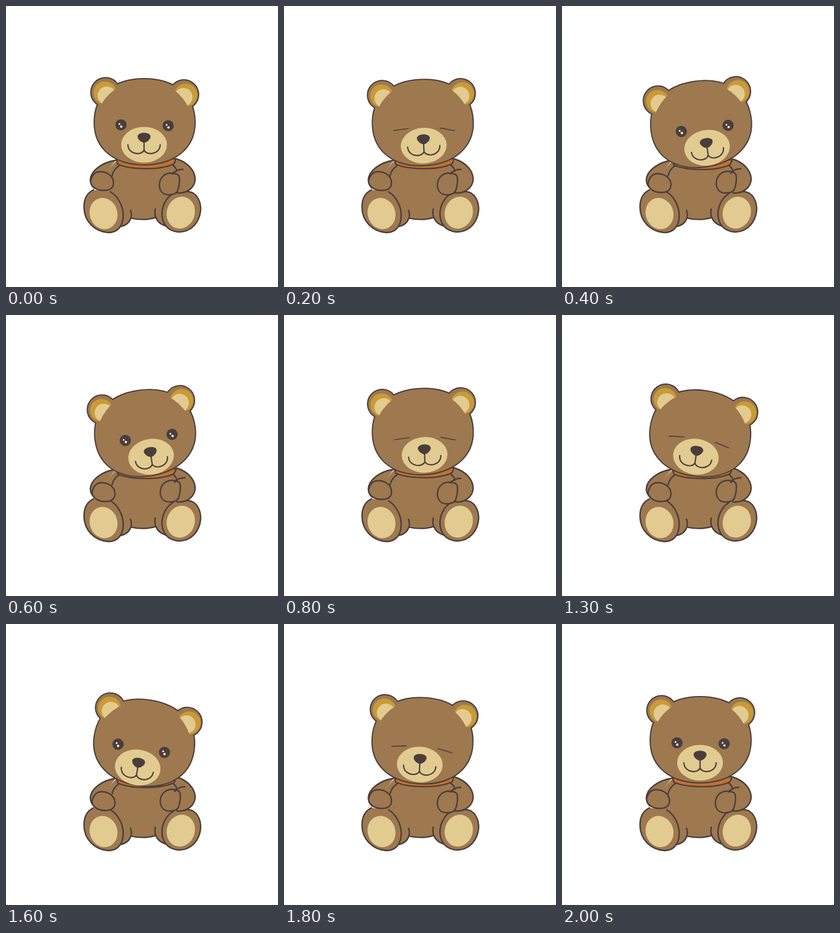
These frames come from a looping animation (463x480 px, 2100 ms). An HTML page with a canvas:

```html
<!DOCTYPE html>
<html lang="en">
<head>
<meta charset="utf-8">
<title>Teddy bear</title>
<style>
  html, body { margin: 0; width: 100%; height: 100%; overflow: hidden; background: #fff; }
  canvas { display: block; }
</style>
</head>
<body>
<canvas id="stage" width="463" height="480"></canvas>
<script>
const ctx = document.getElementById('stage').getContext('2d');
const FUR = '#9e784f', LINE = '#493e3b', CREAM = '#e2cb91', GOLD = '#c99b36', COLLAR = '#c4702f';
const STEP = 100, LOOP = 2100, RAD = Math.PI / 180;

// Full poses at either side: angle, head dx, dy, extra face dx, dy
const RIGHT = [-8.5, 1, 4, 5.5, 1.5];
const LEFT = [9, -1, 5, -4, 3.5];

// One nod, per step: head amount, face amount
const NOD = [[0, 0], [.05, 0], [.35, .1], [.9, .25], [1, 1], [1, 1], [1, 1], [.85, .9], [.33, .4], [.05, .05]];
const BLINK = [2, 3, 7, 8];

const body = new Path2D(`M190 262 L150 306 L180 330 L190 377 C203 376 212 369 213 362
  C226 365 242 365 255 361 C257 368 262 373 272 376 L300 322 L296 264 Z`);
const belly = new Path2D(`M212 349 C214 355 214 358 212.5 362.3 C226 365.3 242 365.3 255 361.3
  M254 347 C253 353 253 357 255 361.3 C258 369 263 373 271 375.5
  M212.5 362.3 C210 370 204 375.5 193 377`);
const leftFoot = new Path2D(`M178 317.5 C191 325 200 343 199.5 359 C199 377 189 387.5 174 387
  C150 385.5 133.3 367 132.8 345 C132.3 330 138.3 319 149 314`);
const rightFoot = new Path2D(`M284 320.5 C267 331 261 355 269 371 C277 386.5 297 389.2 310.5 382.3
  C326.3 374.5 334.3 354.5 330.3 337 C326.3 322 316 314 301 318`);
const leftArm = new Path2D(`M187 263.5 C164 267 143.5 281 143.5 298 C144 303 146 308 150 311`);
const rightArm = new Path2D(`M291 261.5 C308 267 322 280 322 296 C321.5 310 308 321 291 319.3`);
const armFolds = new Path2D(`M193 272.5 C186 277 182 283 180.5 290 M283 271 C287 274 290 278 291 282`);
const elbow = new Path2D(`M301 279 C294 279 287 282 283.5 287`);
const leftHand = new Path2D(`M144 299 C146 290 151 283 160 283 C173 283 183 291 183 302
  C183 312 175 315.5 165 315 C155 315 144 309 144 299 Z`);
const rightHand = new Path2D(`M295 293 C295 288 288 285 280 285.5 C268 286 261 295 261 307
  C262 318 269 323 279 322.5 C288 322 292 318 293 313 C295 306 296 300 295 293 Z`);
const collar = new Path2D(`M188 261 L190.5 270.5 C215 280.5 264 280.5 286 269.5 L290 261 Z`);
const head = new Path2D(`M235 125 C284.5 125 321 150.5 321 199 C321 245 283 270.5 235 270.5
  C187 270.5 151 245 151 199 C151 150.5 185.5 125 235 125 Z`);
const nose = new Path2D(`M235 216.5 C241 216.5 246 219 246 223 C246 228 239 233.5 235 233.5
  C231 233.5 224 228 224 223 C224 219 229 216.5 235 216.5 Z`);
const mouth = new Path2D(`M235 232 L235 246 M207.5 237 C208 254 231 256 235 246
  C239 256 262 254 262.5 237`);

function oval(x, y, rx, ry = rx, turn = 0) {
  const p = new Path2D();
  p.ellipse(x, y, rx, ry, turn * RAD, 0, Math.PI * 2);
  return p;
}

function fill(p, color) {
  ctx.fillStyle = color;
  ctx.fill(p);
}

function stroke(p, width = 2.4) {
  ctx.strokeStyle = LINE;
  ctx.lineWidth = width;
  ctx.stroke(p);
}

function shape(p) {
  fill(p, FUR);
  stroke(p);
}

function moved(dx, dy, draw) {
  ctx.save();
  ctx.translate(dx, dy);
  draw();
  ctx.restore();
}

function drawBody(tilt) {
  const k = tilt > .5 ? 1 : 0;
  fill(body, FUR);
  stroke(belly);
  for (const p of [leftFoot, rightFoot, leftArm, rightArm]) shape(p);
  stroke(armFolds);
  fill(oval(166, 354.5, 23.5, 27, -17), CREAM);
  fill(oval(297.5, 353, 23.8, 27.5, 17), CREAM);
  moved(2.5 * k, 3.5 * k, () => shape(leftHand));
  moved(1.5 * k, -3 * k, () => shape(rightHand));
  moved(3.5 * k, -k, () => stroke(elbow));
  moved(0, 1.5 * k, () => {
    fill(collar, COLLAR);
    stroke(collar);
  });
}

function drawEars() {
  ctx.save();
  const clip = new Path2D('M0 0 H463 V480 H0 Z');
  clip.addPath(oval(235, 210, 84));
  ctx.clip(clip, 'evenodd');
  fill(oval(168.5, 148.5, 19.5), GOLD);
  fill(oval(171.5, 153, 15.5), CREAM);
  fill(oval(306, 152, 19.5), GOLD);
  fill(oval(302, 155.5, 15.5), CREAM);
  ctx.restore();
}

function drawEye(x, y) {
  fill(oval(x, y, 9.6), LINE);
  fill(oval(x - 2.6, y - 1.4, 1.5), '#fff');
  fill(oval(x + .5, y + 2.9, 2), '#fff');
}

function drawLid(x, y, angle) {
  const dx = 12.5 * Math.cos(angle * RAD), dy = 12.5 * Math.sin(angle * RAD);
  stroke(new Path2D(`M${x - dx} ${y - dy} L${x + dx} ${y + dy}`), 1.6);
}

function drawFace(closed, drop) {
  fill(oval(235, 237, 39, 30.5), CREAM);
  moved(0, drop, () => {
    fill(nose, LINE);
    stroke(mouth, 2.2);
  });
  if (closed) {
    drawLid(197.8, 207.5, -5);
    drawLid(276.5, 211.3, 13.5);
  } else {
    drawEye(195.7, 203);
    drawEye(276, 204.5);
  }
}

function drawHead(pose, tilt, face, closed) {
  const [angle, dx, dy, fx, fy] = pose;
  ctx.save();
  ctx.translate(235 + dx * tilt, 200 + dy * tilt);
  ctx.rotate(angle * tilt * RAD);
  ctx.translate(-235, -200);
  const parts = [oval(169.5, 147.5, 24.2), oval(302.8, 151.3, 24.2), head];
  for (const p of parts) stroke(p, 4);
  for (const p of parts) fill(p, FUR);
  drawEars();
  // The face slides along the screen axes, not the tilted ones
  const turn = -angle * tilt * RAD, c = Math.cos(turn), s = Math.sin(turn);
  const x = fx * face, y = fy * face;
  moved(x * c - y * s, x * s + y * c, () => drawFace(closed, 4 * Math.sqrt(face)));
  ctx.restore();
}

function render(now) {
  const step = Math.floor((now % LOOP) / STEP);
  const i = step % NOD.length;
  const [tilt, face] = NOD[i];
  const pose = step < NOD.length ? RIGHT : LEFT;
  ctx.fillStyle = '#fff';
  ctx.fillRect(0, 0, 463, 480);
  drawBody(tilt);
  drawHead(pose, tilt, face, BLINK.includes(i));
}

ctx.lineCap = ctx.lineJoin = 'round';
let start;
function tick(now) {
  start ??= now;
  render(now - start);
  requestAnimationFrame(tick);
}
render(0);
requestAnimationFrame(tick);
</script>
</body>
</html>
```
